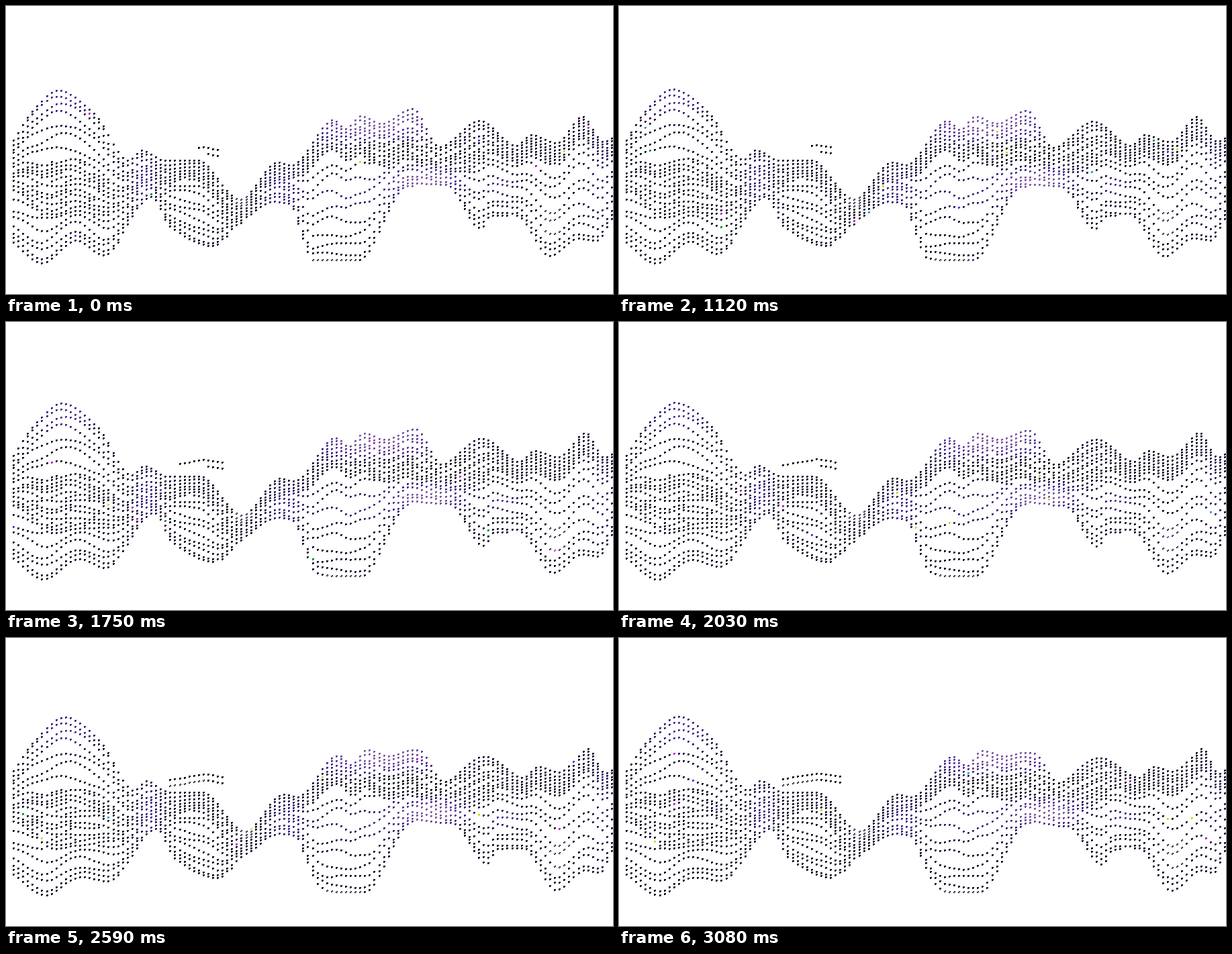
Animation of 904x429 px, one loop 3150 ms. Source, as an HTML page with a canvas:

```html
<!DOCTYPE html>
<html lang="en">
<head>
<meta charset="utf-8">
<title>Dotted wave</title>
<style>
html, body { margin: 0; width: 100%; height: 100%; overflow: hidden; background: #fff; }
canvas { display: block; }
</style>
</head>
<body>
<canvas id="stage" width="904" height="429"></canvas>
<script>
const ctx = document.getElementById('stage').getContext('2d');
const LOOP = 3150, STEP = 70, LAST = LOOP / STEP - 1;
const LEFT = 11, SPAN = 891, COLS = 127, GAP = 4;

const mix = (a, b, t) => a + (b - a) * t;
const clamp = (v, a, b) => Math.max(a, Math.min(b, v));
const smooth = t => t * t * (3 - 2 * t);
const bump = (x, c, w) => Math.exp(-(((x - c) / w) ** 2));
const hash = (a, b) => {
  const v = Math.sin(a * 127.1 + b * 311.7) * 43758.5453;
  return v - Math.floor(v);
};

// monotone cubic through key points: flat at each crest and trough
function curve(keys) {
  const sec = keys.slice(1).map(([x, y], i) => (y - keys[i][1]) / (x - keys[i][0]));
  const slope = keys.map((_, i) => {
    const a = sec[i - 1] ?? sec[i], b = sec[i] ?? a;
    return a * b > 0 ? 2 * a * b / (a + b) : 0;
  });
  return x => {
    let i = 0;
    while (i < keys.length - 2 && keys[i + 1][0] < x) i++;
    const [x0, y0] = keys[i], [x1, y1] = keys[i + 1];
    const w = x1 - x0, t = clamp((x - x0) / w, 0, 1), s = 1 - t;
    return mix(y0, y1, smooth(t)) + w * t * s * (s * slope[i] - t * slope[i + 1]);
  };
}

const topEdge = curve([
  [11,200], [39,157], [78,126], [131,160], [183,230], [202,215], [235,230], [285,230],
  [348,288], [405,233], [425,237], [488,170], [506,183], [528,164], [560,175], [606,153],
  [645,210], [705,171], [760,208], [782,192], [820,204], [858,165], [890,202], [902,197]
]);
const bottomEdge = curve([
  [11,352], [53,383], [105,349], [145,371], [217,284], [244,328], [308,357], [345,327],
  [400,293], [421,296], [458,378], [525,378], [598,268], [655,266], [707,331], [722,312],
  [760,312], [810,372], [852,346], [880,349], [902,317]
]);

const topRise = x => -10 * bump(x, 105, 75) + 8 * bump(x, 500, 35) + 20 * bump(x, 612, 30)
  + 8 * bump(x, 710, 25) - 12 * bump(x, 828, 15);
const bottomRise = x => 8 * bump(x, 105, 20) - 11 * bump(x, 150, 25) - 18 * bump(x, 450, 15)
  + 14 * bump(x, 650, 60) + 5 * bump(x, 800, 25);

// how far down the sheet hangs before it folds back
const foldDepth = x => .18 + .62 * bump(x, 95, 100) + .3 * bump(x, 205, 40)
  + .6 * bump(x, 345, 30) + .3 * bump(x, 400, 25) + .57 * bump(x, 630, 75);

function drift(x) {
  const u = (x - LEFT) / SPAN;
  return (7 + 8 * u) * Math.min(1, u * 16, (1 - u) * 20);
}

// row 0..29 along the sheet: down to the fold, back up, down to the lower edge
function rowDepth(row, fold) {
  const ease = t => mix(t, smooth(t), .6);
  if (row < 13) return fold * ease(row / 13);
  if (row < 18) return fold * (1 - .45 * ease((row - 13) / 5));
  return mix(fold * .55, 1, ease((row - 18) / 11));
}

// x, y, width, height, strength
const GLOW = [
  [85,138,50,32,.6], [205,258,20,42,.5], [410,275,28,35,.45], [545,170,105,38,1],
  [625,260,55,20,1], [520,275,80,30,.45], [735,268,24,14,.6], [885,255,28,80,.35],
  [585,217,75,14,-.8]
];
const RAMP = [[12,8,20], [38,23,72], [78,46,148], [130,94,163]];
const SPARK = ['#b414c8', '#0a8a20', '#d8d010', '#4a20f0', '#0aa0c0', '#c010d8', '#701ae0'];

function shade(x, y) {
  let b = .14;
  for (const [cx, cy, w, h, s] of GLOW) b += s * bump(x, cx, w) * bump(y, cy, h);
  b = clamp(b, 0, .999) * 3;
  const i = Math.floor(b);
  return `rgb(${RAMP[i].map((c, j) => Math.round(mix(c, RAMP[i + 1][j], b - i)))})`;
}

// thinned dots gather in three hollows
const isRing = (x, y) => bump(x, 350, 14) * bump(y, 287, 12) > .4
  || bump(x, 814, 16) * bump(y, 318, 28) > .4 || bump(x, 490, 40) * bump(y, 380, 5) > .4;

function dot(x, y, color, ring) {
  ctx.fillStyle = color;
  ctx.fillRect(x - 1, y - 1, 2, 3);
  ctx.fillRect(x + 1, y - 1, 1, 2);
  if (ring) {
    ctx.fillStyle = '#fff';
    ctx.fillRect(x, y, 1, 1);
    ctx.fillRect(x - 1, y - 1, 1, 1);
  }
}

// short loose strand above the second trough
function strand(x, p) {
  const start = mix(286, 243, smooth(clamp((p - .4) / .25, 0, 1)));
  if (x < start || x > mix(316, 331, p)) return;
  const dx = x - mix(293, 297, p);
  const y = Math.round(mix(210, 201, p) + Math.abs(dx) * .17);
  dot(x, y, '#0c0814', false);
  if (dx > 5 || p > .8) dot(x, y + 9, '#0c0814', dx < 0);
}

function draw(frame) {
  const p = frame / LAST;
  ctx.fillStyle = '#fff';
  ctx.fillRect(0, 0, 904, 429);
  for (let i = 0; i < COLS; i++) {
    const x = Math.round(LEFT + i * SPAN / (COLS - 1));
    const k = mix(smooth(p) ** 1.3, p ** 1.8, clamp((x - 150) / 150, 0, 1));
    const sx = x - drift(x) * k;
    const top = topEdge(sx) + topRise(sx) * k;
    const bottom = bottomEdge(sx) + bottomRise(sx) * k;
    const fold = Math.min(.85, foldDepth(sx));
    const taken = [];
    for (let r = 0; r < 30; r++) {
      const wave = r % 29 ? .22 * Math.sin(r * 2.4 + sx * .055) : 0;
      const y = Math.round(mix(top, bottom, rowDepth(r + wave, fold)));
      if (taken.some(v => Math.abs(v - y) < GAP)) continue;
      taken.push(y);
      const spark = hash(i + frame * 3.7, r + 1.3);
      const color = spark < .006 ? SPARK[Math.floor(spark / .006 * SPARK.length)] : shade(sx, y);
      dot(x, y, color, isRing(sx, y));
    }
    strand(x, p);
  }
}

let shown = -1, start;
function tick(now) {
  start ??= now;
  const frame = Math.floor(Math.max(0, now - start) % LOOP / STEP);
  if (frame !== shown) draw(shown = frame);
  requestAnimationFrame(tick);
}
draw(0);
requestAnimationFrame(tick);
</script>
</body>
</html>
```
